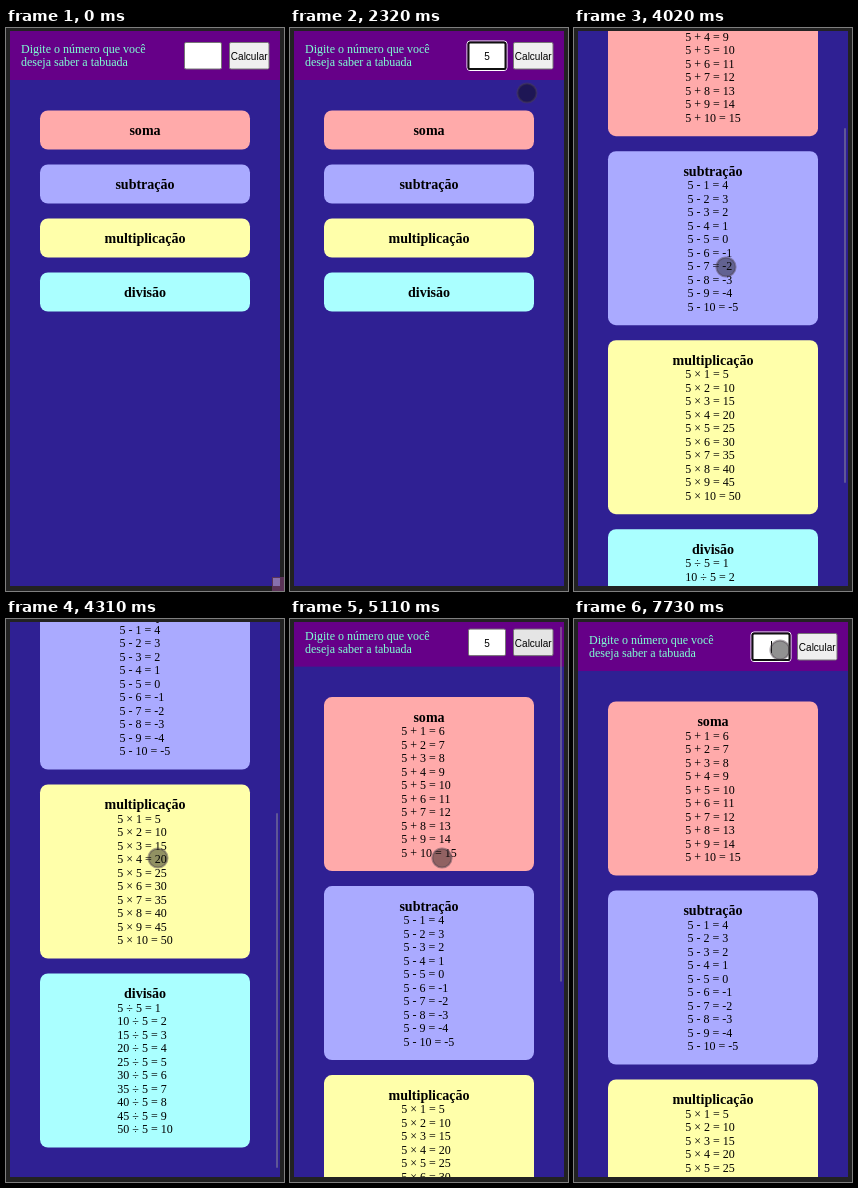
Animation of 278 by 563 pixels, one loop 8000 ms. Source, as an HTML page:

```html
<!DOCTYPE html>
<html lang="pt">
<head>
<meta charset="utf-8">
<title>Tabuada</title>
<style>
  html, body { margin: 0; width: 100%; height: 100%; overflow: hidden; background: #222; }
  svg { display: block; }
  text { white-space: pre; }
  .serif { font: 12px "Liberation Serif", "Times New Roman", serif; }
  .title { font: bold 14.04px "Liberation Serif", "Times New Roman", serif; text-anchor: middle; }
  .sans { font: 10px "Liberation Sans", Arial, sans-serif; text-anchor: middle; }
</style>
</head>
<body>
<svg id="stage" width="278" height="563" viewBox="0 0 278 563">
  <defs><clipPath id="view"><rect x="4" y="3" width="270" height="555"/></clipPath></defs>
  <rect width="278" height="563" fill="#222"/>
  <g clip-path="url(#view)">
    <rect x="4" y="3" width="270" height="555" fill="#2f2093"/>
    <g id="page">
      <rect x="4" y="3" width="270" height="49" fill="#660088"/>
      <g class="serif" fill="#7fffd4">
        <text x="15" y="25">Digite o número que você</text>
        <text x="15" y="38.3">deseja saber a tabuada</text>
      </g>
      <rect x="178.5" y="14.5" width="37" height="26.5" rx="1.5" fill="#fff" stroke="#767676"/>
      <g id="ring" fill="none">
        <rect x="177" y="13" width="40" height="29.5" rx="3" stroke="#fff"/>
        <rect x="178.5" y="14.5" width="37" height="26.5" rx="1.5" stroke="#101010" stroke-width="2"/>
      </g>
      <text id="digit" class="sans" x="197" y="32">5</text>
      <rect id="caret" y="22" width="1" height="12"/>
      <rect id="button" x="223.5" y="14.5" width="39.5" height="26.5" rx="1.5" stroke="#767676"/>
      <text class="sans" x="243.2" y="32">Calcular</text>
      <g id="cards"></g>
    </g>
    <rect id="thumb" x="270" width="2" height="355" rx="1" fill="#999"/>
  </g>
  <g id="corner">
    <rect x="266" y="549" width="12" height="14" fill="#5b3357"/>
    <rect x="267" y="550" width="7" height="8" fill="#8870ae"/>
  </g>
  <circle id="cursor" r="9.6" fill="rgba(12,12,12,.45)" stroke="rgba(75,65,75,.45)" stroke-width="2"/>
</svg>
<script>
const LOOP = 8000, MAX_SCROLL = 295, CARD_TOP = 82.5;
const $ = id => document.getElementById(id);
const clamp = v => Math.max(0, Math.min(1, v));
const progress = (t, a, b) => clamp((t - a) / (b - a));
const within = (t, a, b) => t >= a && t < b;
const set = (node, attrs) => { for (const k in attrs) node.setAttribute(k, attrs[k]); };
const show = (id, on) => { $(id).style.display = on ? '' : 'none'; };

function add(parent, tag, attrs, text = '') {
  const node = document.createElementNS('http://www.w3.org/2000/svg', tag);
  set(node, attrs);
  node.textContent = text;
  return parent.appendChild(node);
}

const operations = [
  { name: 'soma', color: '#ffaaaa', x: 111.3, row: n => `5 + ${n} = ${5 + n}` },
  { name: 'subtração', color: '#aaaaff', x: 113.6, row: n => `5 - ${n} = ${5 - n}` },
  { name: 'multiplicação', color: '#ffffaa', x: 111.3, row: n => `5 × ${n} = ${5 * n}` },
  { name: 'divisão', color: '#aaffff', x: 111.3, row: n => `${5 * n} ÷ 5 = ${n}` }
];

const cards = operations.map(op => {
  const group = add($('cards'), 'g', {});
  const box = add(group, 'rect', { x: 34, width: 210, rx: 8, fill: op.color });
  add(group, 'text', { class: 'title', x: 139, y: 24.8 }, op.name);
  const rows = add(group, 'g', { class: 'serif' });
  for (let n = 1; n <= 10; n++) {
    add(rows, 'text', { x: op.x, y: 38.2 + (n - 1) * 13.5 }, op.row(n));
  }
  return { group, box, rows };
});

// time, x, y
const path = [
  [0, 275, 559], [70, 275, 559], [450, 188, 130], [830, 197, 34], [1290, 197, 34],
  [1360, 223, 45], [1690, 172, 218], [2050, 237, 65], [2330, 237, 65], [2600, 247, 33],
  [3230, 247, 33], [3470, 152, 239], [5540, 152, 239], [5840, 206, 31], [LOOP, 206, 31]
];

function slope(i, axis) {
  const a = path[i - 1], b = path[i], c = path[i + 1];
  if (!a || !c || a[axis] === b[axis] || b[axis] === c[axis]) return 0;
  return (c[axis] - a[axis]) / (c[0] - a[0]);
}

function cursorAt(t) {
  const i = Math.max(1, path.findIndex(p => p[0] > t));
  const a = path[i - 1], b = path[i], d = b[0] - a[0], u = (t - a[0]) / d, v = 1 - u;
  return [1, 2].map(k =>
    a[k] * v * v * (1 + 2 * u) + b[k] * u * u * (3 - 2 * u) +
    d * u * v * (slope(i - 1, k) * v - slope(i, k) * u));
}

function scrollAt(t) {
  if (t < 4930) {
    const p = progress(t, 3740, 4300);
    return MAX_SCROLL * p * p * (3 - 2 * p);
  }
  return MAX_SCROLL * (1 - progress(t, 4930, 5170)) ** 3;
}

function thumbOpacity(t) {
  if (t < 3740) return 0;
  return t < 4930 ? 1 - progress(t, 4500, 4840) : 1 - progress(t, 5560, 5800);
}

function render(t) {
  const open = t >= 2700, scroll = scrollAt(t);
  const height = open ? 174 : 39;
  cards.forEach(({ group, box, rows }, i) => {
    set(group, { transform: `translate(0 ${CARD_TOP + i * (height + 15)})` });
    set(box, { height });
    rows.style.display = open ? '' : 'none';
  });
  set($('page'), { transform: `translate(0 ${-scroll})` });
  set($('thumb'), { y: 5 + scroll * 189 / MAX_SCROLL, opacity: 0.45 * thumbOpacity(t) });

  const typed = within(t, 1680, 7730);
  show('ring', within(t, 1000, 2640) || t >= 6100);
  show('digit', typed);
  show('caret', within(t, 1000, 1500) || within(t, 1680, 2180) || within(t, 6100, 6920) || t >= 7400);
  set($('caret'), { x: typed ? 199 : 197 });
  const fill = within(t, 2640, 3050) ? '#f5f5f5' : within(t, 3050, 6100) ? '#e5e5e5' : '#efefef';
  set($('button'), { fill });

  const [cx, cy] = cursorAt(t);
  set($('cursor'), { cx, cy });
  show('cursor', t >= 70);
  show('corner', t < 70);
}

const start = performance.now();
function tick() {
  render((performance.now() - start) % LOOP);
  requestAnimationFrame(tick);
}
render(0);
requestAnimationFrame(tick);
</script>
</body>
</html>
```
